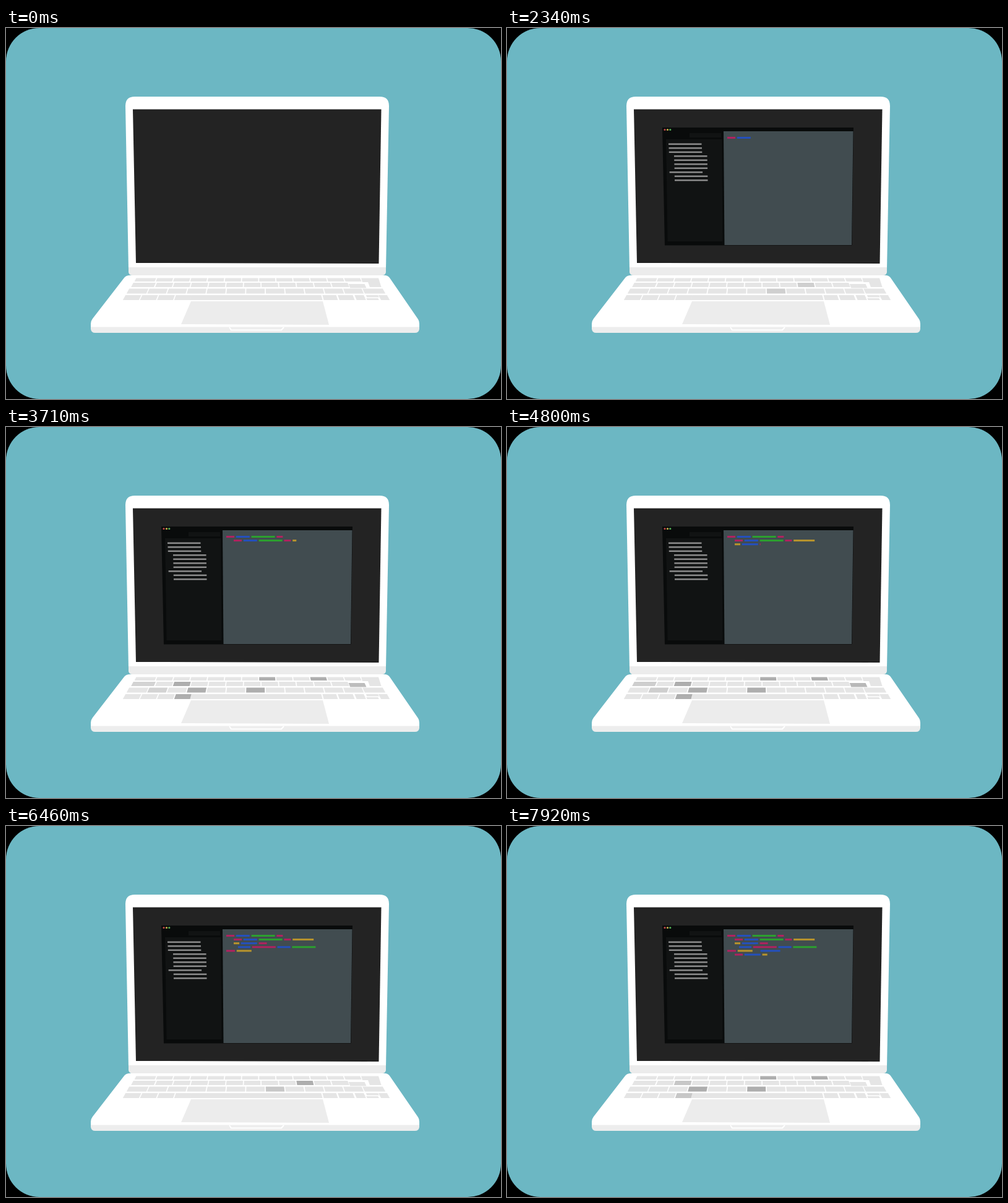
An HTML page for the animation above (8000 ms loop, 800 by 600 pixels).

```html
<!DOCTYPE html>
<html lang="en">
<head>
<meta charset="utf-8">
<title>Laptop typing code</title>
<style>
html, body { margin: 0; width: 100%; height: 100%; overflow: hidden; background: #000; }
svg { display: block; width: 100vw; height: 100vh; }
</style>
</head>
<body>
<svg viewBox="0 0 800 600">
  <rect width="800" height="600" rx="54" fill="#6cb7c3"/>
  <path fill="#fff" d="M193 126Q193 111 208 111H604Q619 111 619 126L614 390H198Z"/>
  <path fill="#232323" d="M205 131.500H606.500L602.500 381L210 380Z"/>
  <path fill="#ececec" d="M198 387H614V395Q613 400 608 400H204Q199 400 198 395Z"/>
  <path fill="#fff" d="M200 400H612Q617 400 620 404L666 471Q668 474 668 478V486H137V478Q137 474 140 470L191 404Q194 400 200 400Z"/>
  <path fill="#ededed" d="M137 483.500H668V487Q667 493 661 493H144Q138 493 137 487Z"/>
  <path fill="none" stroke="#fff" stroke-width="2" d="M361 484L364 488.500H445L449 484"/>
  <path fill="#ececec" d="M299 442H512L522 480L283 479Z"/>
  <g id="keys"></g>
  <g id="window">
    <path fill="#090b0b" d="M251 161H560L557.500 351.500H255Z"/>
    <path fill="#414c50" d="M350 167H559.500L557 351H351.500Z"/>
    <path fill="#111313" d="M257 180H347.500L348.500 345H259.500Z"/>
    <path fill="#111313" d="M295 170H346V177H295Z"/>
    <circle cx="255" cy="164.500" r="1.600" fill="#c4484a"/>
    <circle cx="259.500" cy="164.500" r="1.600" fill="#c9b04a"/>
    <circle cx="263.800" cy="164.500" r="1.600" fill="#4fae55"/>
    <g id="files"></g>
    <g id="code"></g>
  </g>
</svg>
<script>
const LOOP = 8000, FRAME = 1000 / 24;
const $ = id => document.getElementById(id);
const clamp = v => Math.max(0, Math.min(1, v));

function add(parent, tag, attrs) {
  const el = document.createElementNS('http://www.w3.org/2000/svg', tag);
  for (const k in attrs) el.setAttribute(k, attrs[k]);
  parent.append(el);
  return el;
}

// Keyboard: key sides fan out from the middle of the laptop.
const keys = {};
function addKey(name, left, right, top, bottom) {
  const lean = (bottom - top) * 0.0013;
  const at = (x, k) => (404 + (x - 404) * (1 + k)).toFixed(1);
  const d = `M${at(left, -lean)} ${top}H${at(right, -lean)}L${at(right, lean)} ${bottom}H${at(left, lean)}Z`;
  keys[name] = add($('keys'), 'path', { d, fill: '#e5e5e5' });
}
function addRow(row, first, pitch, count, top, bottom) {
  for (let i = 0; i < count; i++) {
    const x = first + i * pitch;
    addKey(row + i, x, x + pitch - 1.7, top, bottom);
  }
}
addKey('tab', 209, 241.5, 404.5, 410);
addRow('a', 243.3, 27.65, 12, 404.5, 410);
addKey('caps', 204, 240.5, 412, 419);
addRow('b', 242.5, 28.42, 11, 412, 419);
addKey('hash', 555, 581, 414, 420.5);
addKey('shift', 197, 228.5, 421.5, 429.5);
addRow('c', 230, 31.65, 11, 421.5, 429.5);
addKey('rshift', 578, 611, 421.5, 429.5);
addRow('d', 191, 27.4, 4, 432, 440);
addKey('space', 298.500, 510.5, 432, 440);
addKey('alt', 512.5, 535, 432, 440);
addKey('cmd', 537.5, 562, 432, 440);
addKey('left', 565, 580, 432, 440);
addKey('up', 582.5, 602, 432, 435.5);
addKey('down', 583, 602, 437, 440);
addKey('right', 604, 618, 432, 440);
add($('keys'), 'path', { d: 'M574 404.5H602L606.500 419H588L585 411H576Z', fill: '#e5e5e5' });

// [key, press start, held length] in frames of a 26-frame typing cycle.
const CYCLE = 26, CYCLE_START = 47;
const presses = [
  ['b8', 23, 8], ['c6', 24, 7],
  ['a6', 5, 9], ['a9', 5, 9], ['c2', 5, 9], ['c5', 5, 9],
  ['b1', 7, 8], ['d3', 7, 8], ['hash', 9.6, 7], ['c0', 10.4, 7], ['caps', 10.4, 7]
];

function drawKeys(t) {
  const frame = t / FRAME;
  for (const [name, start, length] of presses) {
    const age = ((frame - start) % CYCLE + CYCLE) % CYCLE;
    const down = frame - age < CYCLE_START ? 0
      : Math.min(clamp(age / 2), clamp((length - age) / 2));
    const c = Math.round(229 - 55 * down);
    keys[name].setAttribute('fill', `rgb(${c},${c},${c})`);
  }
}

// Sidebar entries.
[0, 0.5, 0.8, 9, 9.2, 9.4, 9.6, 1.6, 9.8, 10].forEach((indent, i) =>
  add($('files'), 'rect', { x: 261 + indent, y: 186.5 + i * 6.5, width: 53.5, height: 2.5, fill: '#8b8b8b' }));

// Code lines: start x, then colour and length of each word.
const colours = { p: '#b0225f', b: '#2450bd', g: '#2ca02f', y: '#b8942c' };
const lines = [
  [356, 'p13 b22 g38 p10'],
  [368, 'p13 b22 g38 p11 y34'],
  [368, 'y9 b26 p13'],
  [375, 'b20 p38 b21 g38'],
  [356, 'p14 y24 b32'],
  [368, 'p13 b26 y24']
];
const words = [];
let total = 0;
lines.forEach(([x, line], row) => line.split(' ').forEach((word, i) => {
  const width = +word.slice(1);
  if (row === 4 && i === 2) x += 10;
  const el = add($('code'), 'rect', { x, y: 176 + row * 6.1, width: 0, height: 3, fill: colours[word[0]] });
  words.push({ el, width, start: total });
  total += width;
  x += width + 2.8;
}));

// Typed length over time, with rests at line ends.
const typing = [[2000, 0], [2340, 35], [3710, 173], [4060, 201], [4350, 201], [4800, 237],
  [6460, 404], [6950, 436], [7560, 436], [7920, 483], [8000, 491]];
function typedLength(t) {
  if (t <= typing[0][0]) return 0;
  const i = typing.findIndex(step => step[0] >= t);
  const [t0, a] = typing[i - 1], [t1, b] = typing[i];
  return a + (b - a) * (t - t0) / (t1 - t0);
}

function drawWindow(t) {
  const p = clamp((t - 880) / 390);
  const s = p * p * (3 - 2 * p);
  $('window').setAttribute('visibility', s > 0 ? 'visible' : 'hidden');
  $('window').setAttribute('transform', `translate(381 264) scale(${s}) translate(-381 -264)`);
  const typed = typedLength(t);
  for (const w of words) w.el.setAttribute('width', Math.max(0, Math.min(w.width, typed - w.start)));
}

const began = performance.now();
function draw() {
  const t = (performance.now() - began) % LOOP;
  drawWindow(t);
  drawKeys(t);
  requestAnimationFrame(draw);
}
draw();
</script>
</body>
</html>
```
